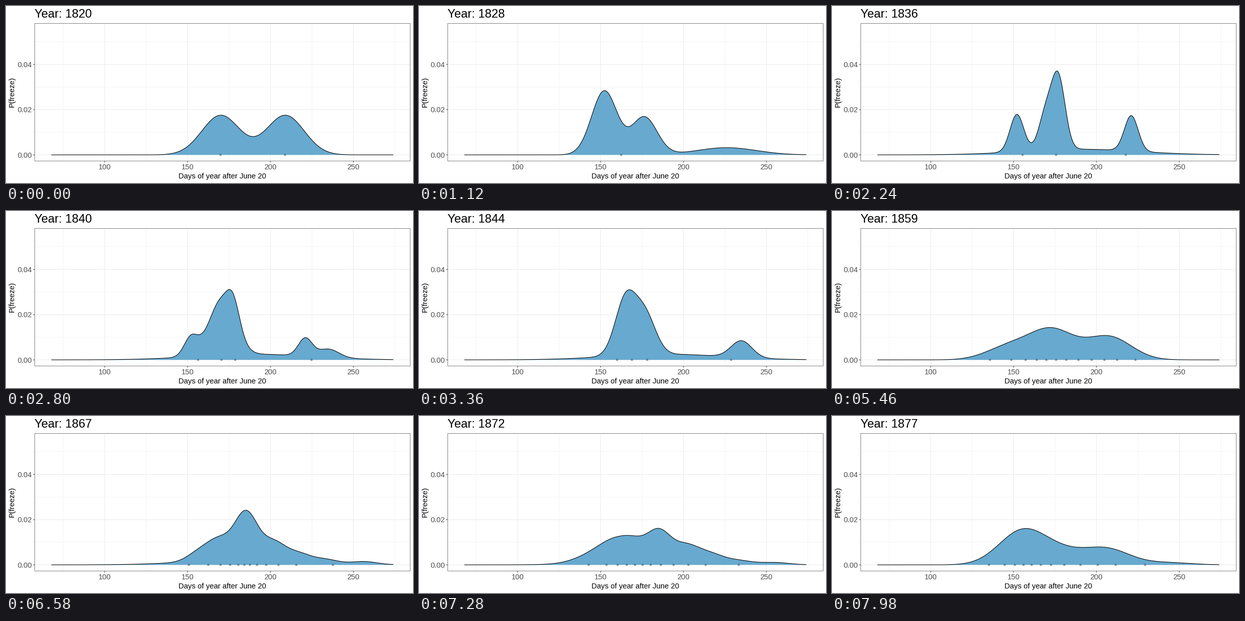
Recreate the animation shown at these times as a matplotlib script. Size 800 by 350 pixels, loop 8 s.

```python
import matplotlib.pyplot as plt
import numpy as np
from matplotlib.animation import FuncAnimation
from matplotlib.collections import LineCollection
from matplotlib.patches import Polygon, Rectangle

plt.rcParams["font.family"] = "Liberation Sans"

W, H, DPI = 800, 350, 72
FIRST_YEAR = 1820
STEP = 7            # ticks per year: 7 * 20 ms
TICKS, TICK_MS = 400, 20

LEFT, RIGHT, TOP, BOTTOM = 56.5, 794.5, 34.5, 306.5
SMALL, LARGE = 14.67, 23.47
BLUE, GRID, DARK, MUTED = "#67a9cf", "#ebebeb", "#333333", "#4d4d4d"
UNIT = 1e-4

days = np.linspace(68, 274, 512)


def px(day):
    return 194 + (np.asarray(day) - 100) * 3.258


def py(p):
    return 294.4 - 4472.5 * np.asarray(p)


def bell(height, centre, spread):
    return UNIT * height * np.exp(-((days - centre) / spread) ** 2 / 2)


def density(spread, peaks, wide=None):
    """Equal-width peaks {day: height}, optionally over one wide bell."""
    curve = sum(bell(h, c, spread) for c, h in peaks.items())
    return curve + bell(*wide) if wide else curve


WIDE = (25, 190, 35)

# Key years: number of observations and their density
KEYS = {
    1820: (2, density(11.4, {170: 175, 209: 175})),
    1828: (1, density(7.7, {152.3: 283, 176.4: 167}, (32, 226, 18))),
    1836: (3, density(4.15, {152: 165, 169.3: 155, 177: 315, 221: 157}, WIDE)),
    1844: (4, density(6.3, {165.2: 252, 177: 169, 235: 74}, WIDE)),
    1859: (12, density(13.5, {147: 57, 173: 130, 207.5: 102})),
    1867: (12, density(7, {157: 40, 169: 83, 185.2: 207, 202: 75, 217: 32,
                           233: 14, 257: 11}, WIDE)),
    1877: (12, density(14, {155: 146, 178: 50, 206: 70, 243: 10})),
}
YEARS = sorted(KEYS)


def quantiles(curve, n):
    """n days that split the area under the curve evenly."""
    area = np.cumsum(curve)
    return np.interp((np.arange(n) + 0.5) / n, area / area[-1], days)


def state(year):
    """Curve and observed days, blended between neighbouring key years."""
    i = min(np.searchsorted(YEARS, year, side="right"), len(YEARS) - 1)
    a, b = YEARS[i - 1], YEARS[i]
    t = (year - a) / (b - a)
    (n0, c0), (n1, c1) = KEYS[a], KEYS[b]
    n = round(n0 + t * (n1 - n0))
    seen = (1 - t) * quantiles(c0, n) + t * quantiles(c1, n)
    return (1 - t) * c0 + t * c1, seen


fig = plt.figure(figsize=(W / DPI, H / DPI), dpi=DPI, facecolor="white")
ax = fig.add_axes([0, 0, 1, 1])
ax.set_xlim(0, W)
ax.set_ylim(H, 0)
ax.axis("off")


def lines(segments, color, width, z):
    ax.add_collection(LineCollection(segments, colors=color, linewidths=width,
                                     zorder=z, snap=False), autolim=False)


def cross(xs, ps):
    return ([[(x, TOP), (x, BOTTOM)] for x in px(xs)]
            + [[(LEFT, y), (RIGHT, y)] for y in py(ps)])


def label(x, y, text, size=SMALL, ha="center", **kw):
    return ax.text(x, y, text, fontsize=size, ha=ha, va="baseline", **kw)


x_ticks, y_ticks = np.arange(100, 251, 50), np.arange(3) * 0.02
lines(cross(np.arange(75, 276, 50), y_ticks + 0.01), GRID, 0.53, 1)
lines(cross(x_ticks, y_ticks), GRID, 1.07, 1)
lines([[(x, BOTTOM), (x, BOTTOM + 3)] for x in px(x_ticks)]
      + [[(LEFT - 3, y), (LEFT, y)] for y in py(y_ticks)], DARK, 1.07, 2)
ax.add_patch(Rectangle((LEFT, TOP), RIGHT - LEFT, BOTTOM - TOP, fill=False,
                       edgecolor="#808080", linewidth=1, zorder=6, snap=False))

for day in x_ticks:
    label(px(day), 323, str(day), color=MUTED)
for p in y_ticks:
    label(51.2, py(p) + 5.3, f"{p:.2f}", color=MUTED, ha="right")
label(425.5, 341, "Days of year after June 20")
label(16.2, 169.5, "P(freeze)", rotation=90, rotation_mode="anchor")

title = label(56.4, 23, "", size=LARGE, ha="left")
fill = Polygon([(0, 0), (1, 1)], facecolor=BLUE, edgecolor="none", zorder=3)
ax.add_patch(fill)
outline, = ax.plot([], [], color="black", linewidth=1.07, zorder=4, snap=False)
dots = ax.scatter([], [], s=11, facecolor=(0, 0, 0, 0.25),
                  edgecolor=(0, 0, 0, 0.35), linewidth=0.9, zorder=5)

xs, base = px(days), py(0)


def update(tick):
    year = FIRST_YEAR + tick // STEP
    curve, seen = state(year)
    ys = py(curve)
    title.set_text(f"Year: {year}")
    outline.set_data(xs, ys)
    fill.set_xy(np.column_stack([np.r_[xs, xs[-1], xs[0]],
                                 np.r_[ys, base, base]]))
    dots.set_offsets(np.column_stack([px(seen), np.full(len(seen), base)]))
    return title, fill, outline, dots


anim = FuncAnimation(fig, update, frames=TICKS, interval=TICK_MS,
                     repeat=True, repeat_delay=0)
plt.show()
```
